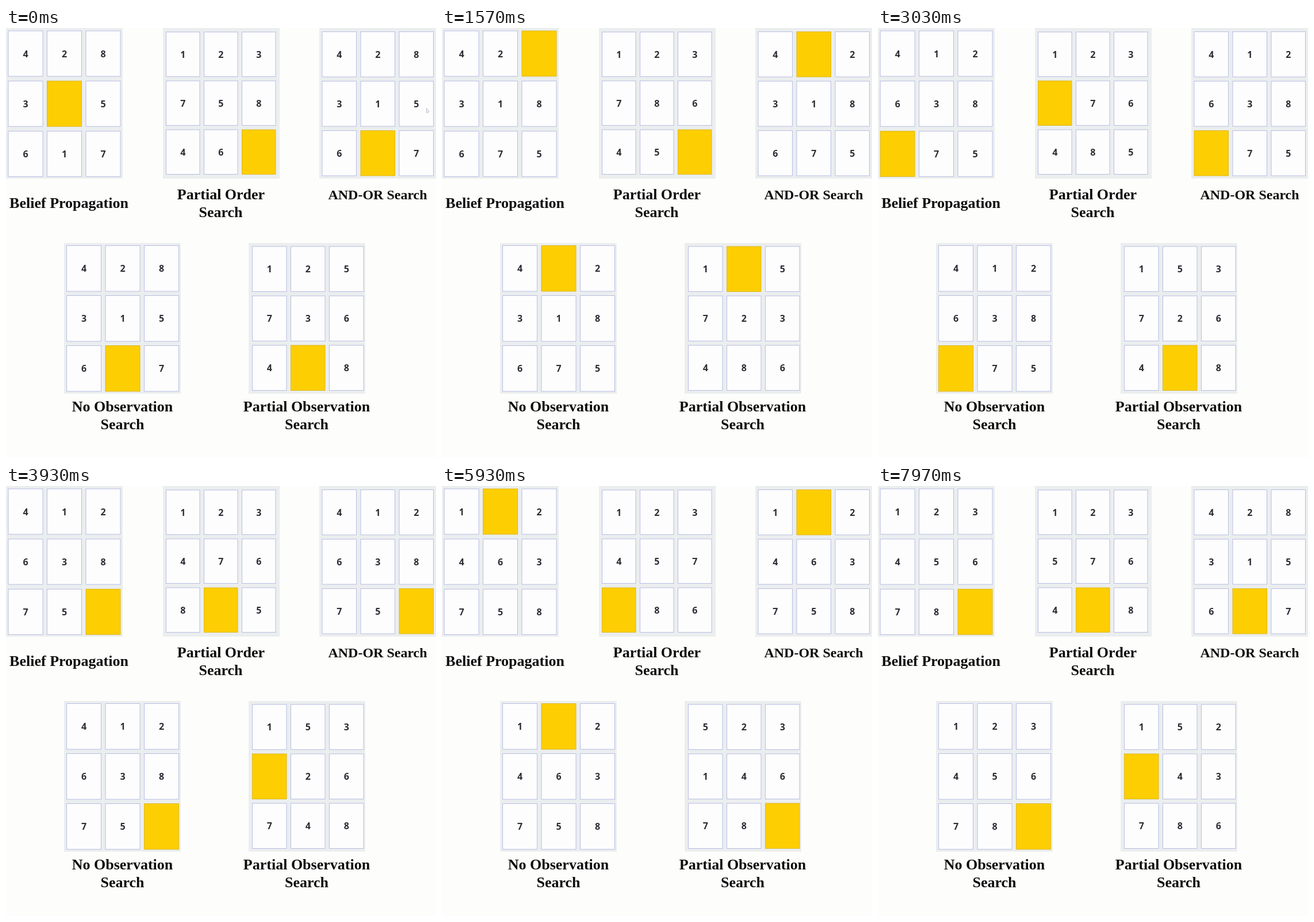
Write an HTML page that moves like this. It is 748 by 748 pixels and loops after 8000 ms.

```html
<!DOCTYPE html>
<html lang="en">
<head>
<meta charset="utf-8">
<title>Sliding puzzle searches</title>
<style>
  html, body { margin: 0; width: 100%; height: 100%; overflow: hidden; background: #fdfdfc; }
  svg { display: block; width: 100%; height: 100%; }
  text { text-anchor: middle; }
  .panel { fill: #ebeeee; }
  .tile { fill: #fdfdfe; stroke: #b8bee4; }
  .blank { fill: #fdce02; stroke: #dcb81c; }
  .digit { font: 700 16px "Open Sans", "Noto Sans", sans-serif; fill: #2c2d35; }
  .label { font: 700 26px "Liberation Serif", "Noto Serif", serif; fill: #0c0c0c; }
  .cursor { fill: #fff; stroke: #b9bac8; }
</style>
</head>
<body>
<svg id="stage" viewBox="0 0 748 748"></svg>
<script>
const LOOP = 8000, MOVE_TIME = 412;
const OFFSET = { U: -3, D: 3, L: -1, R: 1 };

// Moves are the directions in which the empty cell travels; 0 marks it.
// panel: corner; tiles: first x, y, pitch x, y, width, height
const boards = [
  { start: '428305617', moves: 'DRUULDLDRRULLURRDLDR', first: 50,
    panel: [0, 0], tiles: [4, 5, 67.5, 87.2, 60, 79],
    labels: [['Belief Propagation', 109.5, 313]] },
  { start: '123758460', moves: 'LURDLULDRRULDLURRDL', first: 250,
    panel: [273, 0], tiles: [278.5, 7, 66, 85, 58.5, 77.5],
    labels: [['Partial Order', 374, 298], ['Search', 373.5, 329]] },
  { start: '428315607', moves: 'RUULDLDRRULLURRDLDR', first: 250, restart: 7900,
    panel: [545, 0], tiles: [550, 6.5, 67, 86, 59.5, 78.5],
    labels: [['AND-OR Search', 646.5, 298, 24]] },
  { start: '428315607', moves: 'RUULDLDRRULLURRDLDR', first: 250,
    panel: [101, 374], tiles: [105.5, 378.5, 67.5, 87, 60, 79.5],
    labels: [['No Observation', 202.5, 667], ['Search', 202.5, 698]] },
  { start: '125736408', moves: 'RULURDDLLUURDDRUULLD', first: 105,
    panel: [422, 374], tiles: [428.5, 380, 67, 86, 59.5, 78.5],
    labels: [['Partial Observation', 523, 667], ['Search', 523, 698]] }
];

const stage = document.getElementById('stage');

function add(tag, attributes, content = '') {
  const node = document.createElementNS('http://www.w3.org/2000/svg', tag);
  for (const name in attributes) node.setAttribute(name, attributes[name]);
  node.textContent = content;
  return stage.appendChild(node);
}

function slide(state, move) {
  const cells = [...state];
  const from = cells.indexOf('0'), to = from + OFFSET[move];
  [cells[from], cells[to]] = [cells[to], cells[from]];
  return cells.join('');
}

for (const board of boards) {
  board.states = [board.start];
  for (const move of board.moves) board.states.push(slide(board.states.at(-1), move));

  add('rect', { class: 'panel', x: board.panel[0], y: board.panel[1], width: 203, height: 262 });
  const [left, top, pitchX, pitchY, width, height] = board.tiles;
  board.cells = Array.from({ length: 9 }, (_, i) => {
    const x = left + i % 3 * pitchX, y = top + Math.floor(i / 3) * pitchY;
    return {
      tile: add('rect', { x, y, width, height }),
      digit: add('text', { class: 'digit', x: x + width / 2, y: y + height / 2 + 6 })
    };
  });
  for (const [text, x, y, size = 26] of board.labels)
    add('text', { class: 'label', x, y, style: `font-size:${size}px` }, text);
}
const cursor = add('path', { class: 'cursor', d: 'M731.5 139.5v8l2-1.5 1.5 2.5M731.5 139.5l4.5 5.5h-2.5' });

function render(time) {
  for (const { states, cells, first, restart = Infinity } of boards) {
    const moved = Math.floor((time - first) / MOVE_TIME) + 1;
    const step = time < restart ? Math.max(0, Math.min(moved, states.length - 1)) : 0;
    cells.forEach(({ tile, digit }, i) => {
      const value = states[step][i];
      tile.setAttribute('class', value === '0' ? 'blank' : 'tile');
      digit.textContent = value === '0' ? '' : value;
    });
  }
  cursor.style.display = time < 250 ? '' : 'none';
}

const startTime = performance.now();
function frame() {
  render((performance.now() - startTime) % LOOP);
  requestAnimationFrame(frame);
}
frame();
</script>
</body>
</html>
```
